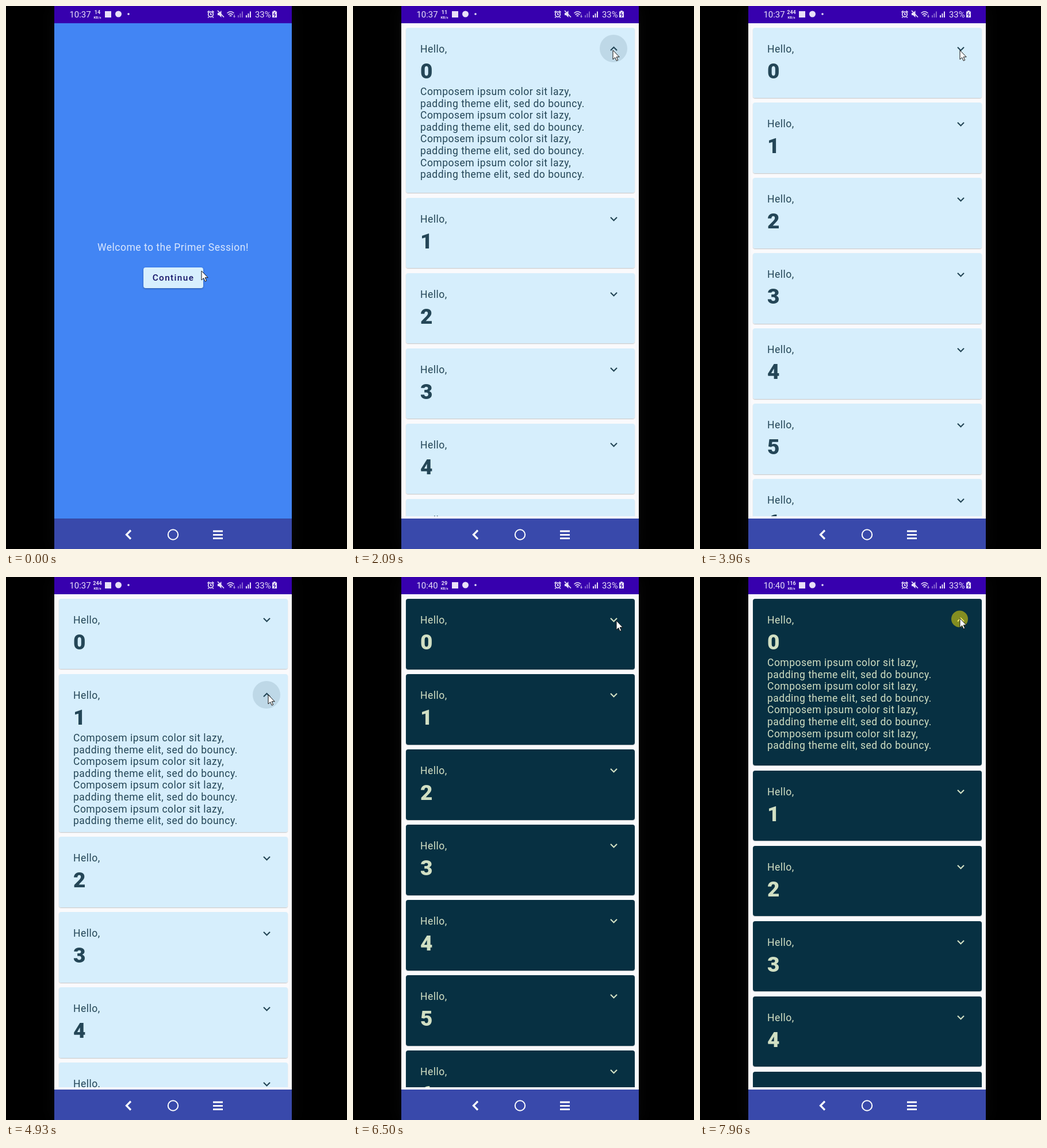
These frames come from a looping animation (593 px wide and 945 px high, 8000 ms). An HTML page:

```html
<!DOCTYPE html>
<html lang="en">
<head>
<meta charset="utf-8">
<title>Expanding cards</title>
<style>
  html, body { margin: 0; width: 100%; height: 100%; overflow: hidden; background: #000; }
  #stage { position: absolute; left: 0; top: 0; width: 593px; height: 945px; overflow: hidden;
    font: 17.55px/20.6px Roboto, sans-serif; letter-spacing: .48px; white-space: nowrap; }
  #stage div, #stage svg, #stage span { position: absolute; }
  #glow { left: 84px; top: 0; width: 413px; height: 945px; box-shadow: 0 0 30px rgba(255,255,255,.04); }
  #screen { left: 84px; top: 29px; width: 413px; height: 863px; background: #fafafc; }
  #list { left: 0; top: 0; width: 413px; height: 858.5px; overflow: hidden; }
  .card { left: 8px; width: 397.5px; height: 122.5px; border-radius: 4px; overflow: hidden;
    background: #d6eefc; color: #244657; }
  .shade { left: 8px; width: 397.5px; border-radius: 4px; box-shadow: 0 1px 1.5px rgba(0,0,0,.22); }
  .dark .card { background: #073042; color: #d1dfc3; }
  .hello { left: 25px; top: 27px; }
  .digit { left: 25px; top: 54px; font-size: 37px; line-height: 43.4px; font-weight: 800; letter-spacing: 0; }
  .body { left: 25px; top: 101px; white-space: pre; }
  .arrow { left: 348.5px; top: 24.3px; width: 25px; height: 25px; fill: currentColor; }
  .ripple { left: 336.5px; top: 12px; width: 48px; height: 48px; border-radius: 50%; background: #244657; opacity: 0; }
  #welcome { inset: 0; background: #4285f4; }
  #greeting { left: 0; width: 413px; top: 381px; text-align: center; color: #dae7fd; }
  #button { left: 155px; top: 425.5px; width: 104px; height: 36.5px; border-radius: 4px; background: #d7effe;
    box-shadow: 0 1px 3px rgba(0,0,0,.35); color: #14146a; text-align: center;
    font-size: 15.4px; line-height: 37.5px; font-weight: 500; letter-spacing: 1.35px; }
  #status { left: 84px; top: 0; width: 413px; height: 29.6px; background: #3700ae; color: #e9e1f8;
    font-size: 14.9px; line-height: 30px; letter-spacing: 0; }
  #speed { left: 62px; top: 6.5px; width: 26px; text-align: center; font-size: 9px; line-height: 9px; font-weight: 700; }
  #unit { left: 62px; top: 15.5px; width: 26px; text-align: center; font-size: 6px; line-height: 7px; font-weight: 700; }
  #nav { left: 84px; top: 892px; width: 413px; height: 53px; background: #3949ab; }
  #overlay { left: 0; top: 0; }
</style>
</head>
<body>
<div id="stage">
  <div id="glow"></div>
  <div id="screen">
    <div id="list"></div>
    <div id="welcome">
      <div id="greeting">Welcome to the Primer Session!</div>
      <div id="button">Continue</div>
    </div>
  </div>
  <div id="status">
    <span id="clock" style="left:26.5px"></span>
    <span id="speed"></span><span id="unit">KB/s</span>
    <span style="left:349px">33%</span>
  </div>
  <div id="nav"></div>
  <svg id="overlay" width="593" height="945" fill="none">
    <g fill="#e9e1f8">
      <rect x="172" y="9" width="11" height="11"/>
      <circle cx="195.5" cy="14" r="5.5"/>
      <circle cx="213" cy="14" r="1.8"/>
      <path d="M368 12h2.5l4-4v12l-4-4H368z"/>
      <path d="M417 20v-4h2v4zM420.5 20v-7h2v7zM424 20V9.5h2V20z"/>
      <path d="M403 20v-4h2v4zM406.500 20v-7h2v7zM410 20V9.500h2V20z" opacity=".45"/>
      <path d="M465.300 8h3.400v1.500h2.300V20h-8V9.500h2.300z"/>
    </g>
    <g stroke="#e9e1f8" stroke-width="1.700">
      <circle cx="356" cy="14.500" r="4.300"/>
      <path d="M350.500 11l3-2.700M361.500 11l-3-2.700M356 12v3h2M352.500 19l-1.200 1.500M359.500 19l1.200 1.500M368 8l11 11.500"/>
      <path d="M384.500 12.500q6-5.500 12 0M386.500 15.200q4-3.600 8 0M388.700 17.600q1.800-1.500 3.600 0" stroke-width="1.500"/>
      <path d="M397 15v4.500M395.500 18l1.500 1.500 1.500-1.500" stroke-width="1"/>
    </g>
    <path d="M467.500 11l-2 4h3l-2 4" stroke="#3700ae" stroke-width="1.200"/>
    <g stroke="#fff">
      <path d="M217 912.500l-7.500 7.500 7.500 7.500" stroke-width="3.200"/>
      <circle cx="290.500" cy="920" r="8.700" stroke-width="2"/>
      <path d="M360 914h17M360 920.300h17M360 926.500h17" stroke-width="2.800"/>
    </g>
    <path id="edge" d="M84 892.500h413" stroke="#33489f"/>
    <g id="cursor">
      <circle id="press" cx="-.5" cy="1" r="14.500" fill="#ffea00" fill-opacity=".5"/>
      <path d="M0 0v16l3.700-3.400 2.500 5.700 2.500-1.100-2.500-5.500h5z" fill="#fff" stroke="#111" stroke-linejoin="round"/>
    </g>
  </svg>
</div>
<script>
const LOOP = 8000, LIST_AT = 890, DARK_AT = 6100;
const CARD_H = 122.5, GROWTH = 168.5, GAP = 8.5, FIRST_TOP = 9;
const ICON_DOWN = 'M16.59 8.59L12 13.17 7.41 8.59 6 10l6 6 6-6z';
const ICON_UP = 'M12 8l-6 6 1.41 1.41L12 10.83l4.59 4.58L18 14z';

// [time, card, open]
const toggles = [[1525, 0, 1], [3190, 0, 0], [4780, 1, 1], [DARK_AT, 1, 0], [7315, 0, 1]];
// [time, x, y] of the pointer tip
const path = [[0, 340, 461], [70, 340, 461], [350, 322, 469], [LIST_AT, 322, 469], [1160, 440, 100],
  [1420, 440, 100], [1500, 452, 77], [4200, 452, 77], [4600, 456, 205], [DARK_AT, 456, 205],
  [DARK_AT, 458, 76], [6900, 458, 76], [7250, 452, 72], [LOOP, 452, 72]];
const speeds = [[0, 14], [1430, 11], [3500, 244], [5100, 206], [DARK_AT, 29], [7250, 116]];
const presses = [[7250, 7380], [7890, LOOP]];

const $ = id => document.getElementById(id);
const clamp = v => Math.min(1, Math.max(0, v));
const latest = (table, t) => table.filter(row => row[0] <= t).pop();

function add(parent, cls, text = '') {
  const el = document.createElement('div');
  el.className = cls;
  el.textContent = text;
  return parent.appendChild(el);
}

const sentence = 'Composem ipsum color sit lazy,\npadding theme elit, sed do bouncy.';
const cards = Array.from({ length: 7 }, (_, i) => {
  const shade = add($('list'), 'shade'), box = add($('list'), 'card');
  add(box, 'hello', 'Hello,');
  add(box, 'digit', i);
  const body = add(box, 'body', Array(4).fill(sentence).join('\n'));
  const ripple = add(box, 'ripple');
  box.insertAdjacentHTML('beforeend', '<svg class="arrow" viewBox="0 0 24 24"><path/></svg>');
  return { shade, box, body, ripple, icon: box.querySelector('path') };
});

// Underdamped spring: stiffness 200, damping ratio 0.5
function spring(ms) {
  const s = ms / 1000, decay = 7.07, freq = 12.25;
  return 1 - Math.exp(-decay * s) * (Math.cos(freq * s) + decay / freq * Math.sin(freq * s));
}

function pointerAt(t) {
  const i = path.findLastIndex(p => p[0] <= t);
  const [t0, x0, y0] = path[i], [t1, x1, y1] = path[Math.min(i + 1, path.length - 1)];
  const u = t1 > t0 ? (t - t0) / (t1 - t0) : 0, e = u * u * (3 - 2 * u);
  return [x0 + (x1 - x0) * e, y0 + (y1 - y0) * e];
}

function drawCards(t) {
  let top = FIRST_TOP;
  cards.forEach((card, i) => {
    const toggle = latest(toggles.filter(row => row[1] === i), t);
    const open = toggle ? toggle[2] : 0;
    let grown = 0, glow = 0;
    if (toggle) {
      const age = t - toggle[0];
      const moved = toggle[0] === DARK_AT ? 1 : spring(age);
      grown = open ? moved : 1 - moved;
      if (t < DARK_AT) glow = clamp(age / 75) * clamp((740 - age) / 150);
    }
    const height = CARD_H + GROWTH * grown;
    for (const el of [card.shade, card.box]) {
      el.style.top = top + 'px';
      el.style.height = height + 'px';
    }
    card.body.style.display = open ? '' : 'none';
    card.icon.setAttribute('d', open ? ICON_UP : ICON_DOWN);
    card.ripple.style.opacity = .13 * glow;
    top += height + GAP;
  });
}

function render(t) {
  const dark = t >= DARK_AT, welcome = t < LIST_AT;
  $('stage').classList.toggle('dark', dark);
  $('welcome').style.display = welcome ? '' : 'none';
  $('edge').style.display = welcome ? '' : 'none';
  $('clock').textContent = dark ? '10:40' : '10:37';
  $('speed').textContent = latest(speeds, t)[1];
  drawCards(t);
  const [x, y] = pointerAt(t);
  $('cursor').setAttribute('transform', `translate(${x} ${y})`);
  $('press').style.display = presses.some(([a, b]) => t >= a && t < b) ? '' : 'none';
}

const start = performance.now();
function tick() {
  render((performance.now() - start) % LOOP);
  requestAnimationFrame(tick);
}
tick();
</script>
</body>
</html>
```
